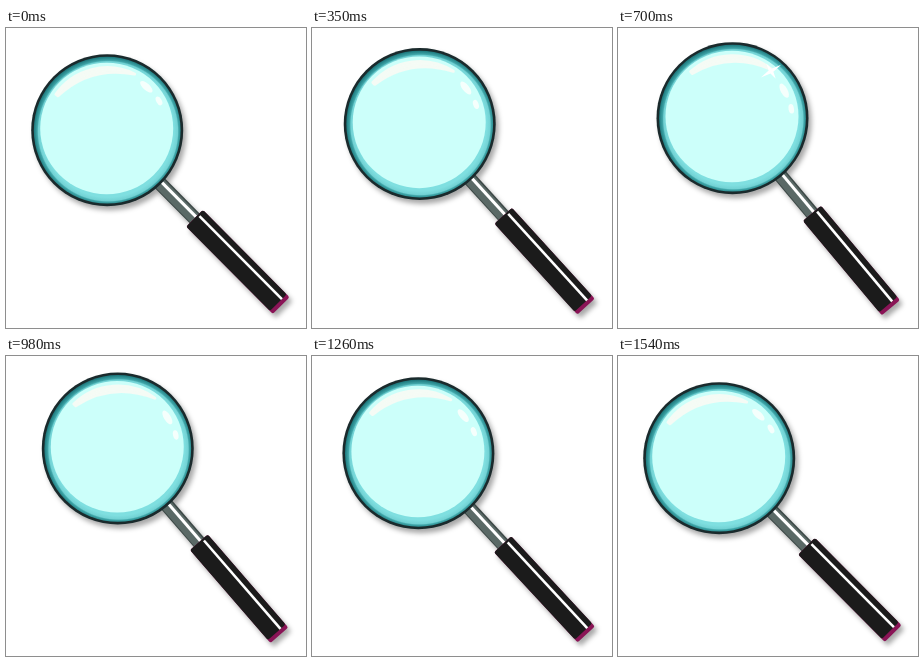
Recreate the animation shown at these times as an HTML page with a canvas. Size 300x300 px, loop 1.61 s.

```html
<!DOCTYPE html>
<html lang="en">
<head>
<meta charset="utf-8">
<title>Magnifying glass</title>
<style>
  html, body { margin: 0; height: 100%; overflow: hidden; background: #fff; }
  canvas { display: block; filter: drop-shadow(3px 4px 2.5px rgba(0, 0, 0, .34)); }
</style>
</head>
<body>
<canvas width="300" height="300"></canvas>
<script>
const ctx = document.querySelector('canvas').getContext('2d');
const STEP = 70, STEPS = 23, PEAK = 11;
const PIVOT = { x: 249, y: 252 }, LENS = { x: 101.2, y: 102.2 };
const rad = deg => deg * Math.PI / 180;

const rim = ctx.createRadialGradient(.8, 1, 66, .8, 1, 74);
rim.addColorStop(0, '#7fdfe0');
rim.addColorStop(.45, '#72d2d4');
rim.addColorStop(.6, '#3fa5a8');
rim.addColorStop(1, '#1f7c80');

function ellipse(x, y, rx, ry, color) {
  ctx.fillStyle = color;
  ctx.beginPath();
  ctx.ellipse(x, y, rx, ry, 0, 0, 2 * Math.PI);
  ctx.fill();
}

function bar(x, y, w, h, color, radius = 0) {
  ctx.fillStyle = color;
  ctx.beginPath();
  ctx.roundRect(x, y, w, h, radius);
  ctx.fill();
}

function rotated(deg, draw) {
  ctx.save();
  ctx.rotate(rad(deg));
  draw();
  ctx.restore();
}

// The x axis runs from the lens centre down the handle.
function drawHandle() {
  bar(73, -7, 54, 14, '#3c4846');
  bar(73, -5.5, 54, 11.5, '#5a6966');
  bar(73, -3.5, 54, 3, '#fff');
  bar(124, -11.7, 123, 23.6, '#8a1456', 2);
  bar(124, -11.7, 119, 23.6, '#1b1b1b', 2);
  bar(126, -6.2, 117, 2.6, '#fff');
}

function drawLens() {
  ellipse(0, 0, 76, 76, '#1a2a2c');
  ellipse(0, 0, 73.4, 73.4, rim);
  ellipse(-.5, -1.7, 66.5, 65.8, '#ccfffa');
}

function drawStreak() {
  const from = rad(215), to = rad(296), mid = rad(255);
  ctx.beginPath();
  ctx.arc(0, 0, 62.5, from, to);
  ctx.quadraticCurveTo(67 * Math.cos(mid), 67 * Math.sin(mid),
    60 * Math.cos(from), 60 * Math.sin(from));
  ctx.closePath();
  ctx.fillStyle = ctx.strokeStyle = '#f5fbf5';
  ctx.lineWidth = 3;
  ctx.lineJoin = 'round';
  ctx.fill();
  ctx.stroke();
}

function drawStar(x, y, size) {
  ctx.save();
  ctx.translate(x, y);
  ctx.rotate(rad(-32));
  ctx.beginPath();
  for (let i = 0; i < 8; i++) {
    const r = size * (i % 2 ? .2 : i % 4 ? .75 : 1);
    ctx.lineTo(r * Math.cos(i * Math.PI / 4), r * Math.sin(i * Math.PI / 4));
  }
  ctx.fillStyle = '#fff';
  ctx.fill();
  ctx.restore();
}

function draw(now) {
  const step = Math.floor(now / STEP) % STEPS;
  const swing = PEAK - Math.abs(step - PEAK);
  const angle = .489 * swing, a = rad(angle);
  const dx = LENS.x - PIVOT.x, dy = LENS.y - PIVOT.y;

  ctx.clearRect(0, 0, 300, 300);
  ctx.save();
  ctx.translate(PIVOT.x + dx * Math.cos(a) - dy * Math.sin(a),
    PIVOT.y + dx * Math.sin(a) + dy * Math.cos(a));
  rotated(45.2 + angle, drawHandle);
  drawLens();
  // Reflections slide round the glass faster than it turns.
  rotated(1.3 * swing, drawStreak);
  rotated(-48 + 2 * swing, () => ellipse(58.5, 0, 3.4, 7.8, '#f5fffc'));
  rotated(-29.5 + 2.05 * swing, () => ellipse(59.5, 0, 2.7, 4.8, '#f5fffc'));
  const glint = Math.max(0, 1 - (PEAK - swing) / 3);
  if (glint) drawStar(38.5, -47, 18 * glint);
  ctx.restore();
  requestAnimationFrame(draw);
}
requestAnimationFrame(draw);
</script>
</body>
</html>
```
